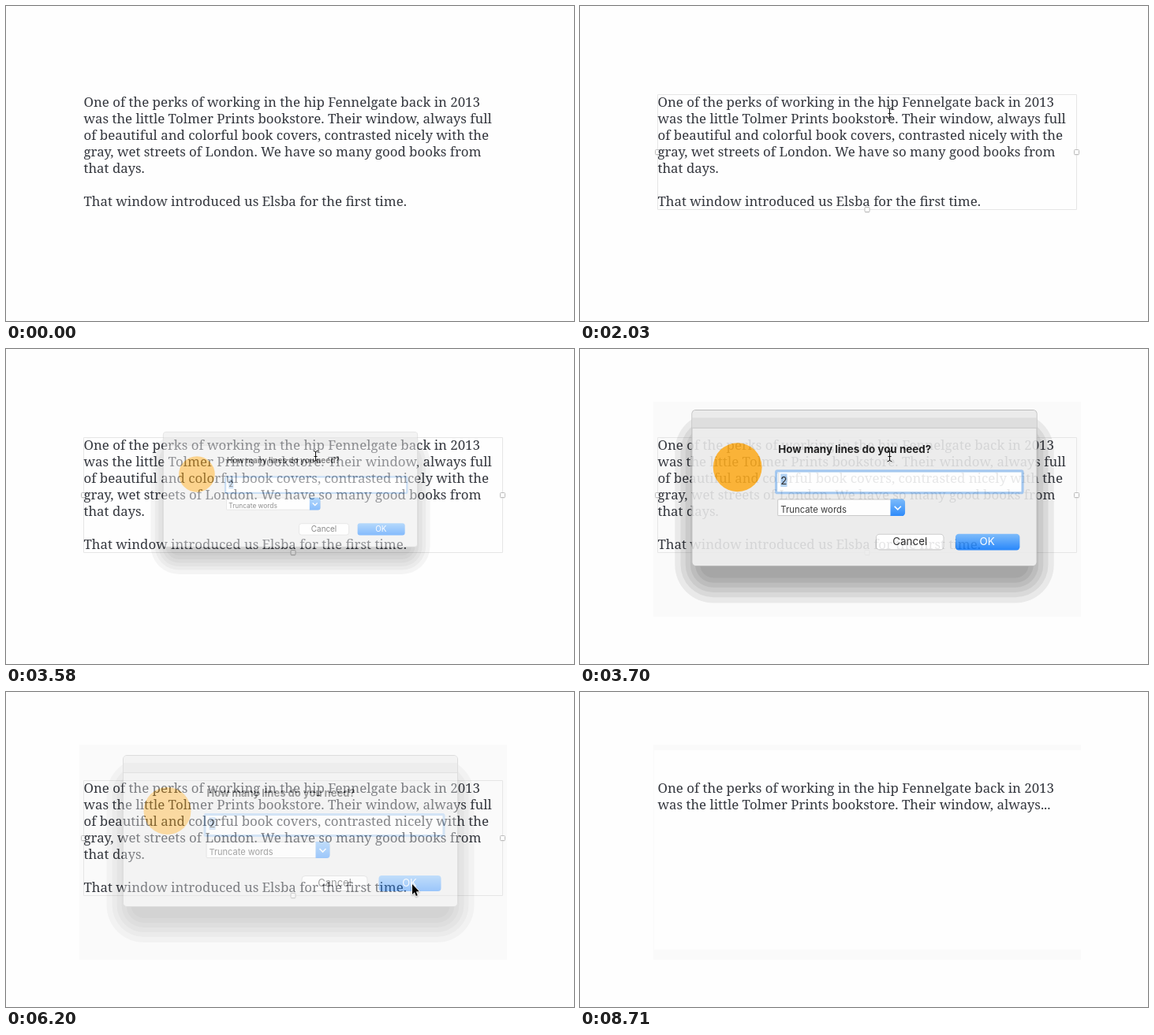
These frames come from a looping animation (720x400 px, 9.19 s). An HTML page with a canvas:

```html
<!DOCTYPE html>
<html lang="en">
<head>
<meta charset="utf-8">
<title>Truncate lines</title>
<style>
html, body { margin: 0; width: 100%; height: 100%; overflow: hidden; background: #fefefe; }
canvas { display: block; }
</style>
</head>
<body>
<canvas id="stage" width="720" height="400"></canvas>
<script>
const LOOP = 9190, STEP = 120;
const PAPER = '#fefefe', INK = '#34373e';
const SERIF = '16.85px "Noto Serif", serif';
const UI = 'Inter, sans-serif';

const stage = document.getElementById('stage').getContext('2d');
const layerCanvas = document.createElement('canvas');
layerCanvas.width = 720;
layerCanvas.height = 400;
const layer = layerCanvas.getContext('2d');

const paragraph = [
  'One of the perks of working in the hip Fennelgate back in 2013',
  'was the little Tolmer Prints bookstore. Their window, always full',
  'of beautiful and colorful book covers, contrasted nicely with the',
  'gray, wet streets of London. We have so many good books from',
  'that days.',
  '',
  'That window introduced us Elsba for the first time.'
];
const truncated = [paragraph[0], paragraph[1].replace(' full', '...')];

// Pointer tips, one per step, starting at the given time.
const moves = [
  { start: 1560, tips: [[417, 270], [405, 208], [396, 160], [392, 140], [392, 136]] },
  { start: 4410, tips: [[397, 145], [415, 183], [441, 219], [474, 243], [504, 253], [514, 255]] },
  { start: 5600, tips: [[514, 252], [515, 246], [515, 243]] }
];

function box(c, x, y, w, h, r, fill, stroke) {
  c.beginPath();
  c.roundRect(x, y, w, h, r);
  if (fill) { c.fillStyle = fill; c.fill(); }
  if (stroke) { c.strokeStyle = stroke; c.lineWidth = 1; c.stroke(); }
}

function label(c, text, x, y, font, color = '#161616', align = 'left') {
  c.font = font;
  c.fillStyle = color;
  c.textAlign = align;
  c.fillText(text, x, y);
}

function ramp(c, top, bottom, from, to) {
  const g = c.createLinearGradient(0, top, 0, bottom);
  g.addColorStop(0, from);
  g.addColorStop(1, to);
  return g;
}

function polyline(c, points) {
  c.beginPath();
  points.forEach(([x, y]) => c.lineTo(x, y));
}

function drawText(lines) {
  lines.forEach((line, i) => label(stage, line, 98.5, 128 + 21 * i, SERIF, INK));
}

function drawSelection() {
  box(stage, 98.5, 112.5, 531, 146, 0, null, '#e6e6e6');
  for (const [x, y] of [[98.5, 185.5], [629.5, 185.5], [364, 258.5]]) {
    box(stage, x - 3, y - 2, 6, 6, 1, '#dcdcdc');
    box(stage, x - 3, y - 3, 6, 6, 1, '#fff', '#bcbcbc');
  }
}

function drawDialog(c) {
  for (const spread of [21, 14, 8, 2, -4, -10]) {
    box(c, 149 - spread, 105 - spread, 424 + 2 * spread, 192 + 2 * spread, 26 + spread, 'rgba(0,0,0,.077)');
  }
  box(c, 149, 80.5, 424, 192, 4.5, '#ebebeb', '#b4b4b4');
  box(c, 149.5, 81, 423, 9, [4, 4, 0, 0], '#e9e9e9');
  box(c, 149.5, 90, 423, 12, 0, '#dbdbdb');
  box(c, 149.5, 102, 423, 1, 0, '#bdbdbd');

  c.beginPath();
  c.arc(205, 151, 30, 0, Math.PI * 2);
  c.fillStyle = '#fbaa1e';
  c.fill();

  label(c, 'How many lines do you need?', 255, 133, `700 13px ${UI}`, '#0c0c0c');

  box(c, 251, 154, 306, 30, 3, '#98c1ee');
  box(c, 254, 157, 300, 24, 0, '#fff');
  box(c, 258, 159, 8, 16, 0, '#a9cdf3');
  label(c, '2', 258, 172, `13px ${UI}`);

  box(c, 254.5, 190.5, 156, 20, [1, 4, 4, 1], '#fff', '#c4c4c4');
  label(c, 'Truncate words', 258, 207, `11px ${UI}`, '#222');
  box(c, 393, 190, 18, 21, [0, 4, 4, 0], ramp(c, 190, 211, '#6cb3fa', '#137cfb'));
  polyline(c, [[398, 199], [402, 203], [406, 199]]);
  c.strokeStyle = '#fff';
  c.lineWidth = 1.6;
  c.stroke();

  box(c, 375.5, 233.5, 83, 19, 4, '#fff', '#c8c8c8');
  label(c, 'Cancel', 417, 247, `13px ${UI}`, '#161616', 'center');
  box(c, 473, 233, 79, 20, 4, ramp(c, 233, 253, '#6eb4fa', '#0c78fc'));
  label(c, 'OK', 512, 247, `13px ${UI}`, '#fff', 'center');
}

function showDialog({ scale, alpha, cy }) {
  layer.setTransform(1, 0, 0, 1, 0, 0);
  layer.clearRect(0, 0, 720, 400);
  layer.translate(360.5, cy);
  layer.scale(scale, scale);
  layer.translate(-361, -176);
  drawDialog(layer);
  stage.globalAlpha = alpha;
  stage.drawImage(layerCanvas, 0, 0);
  stage.globalAlpha = 1;
}

function dialogPose(t) {
  if (t < 3460 || t >= 6320) return null;
  if (t < 3580) return { scale: .25, alpha: .1, cy: 183 };
  if (t < 3700) return { scale: .76, alpha: .5, cy: 178 };
  if (t < 3820) return { scale: 1.031, alpha: .88, cy: 176 };
  return { scale: 1, alpha: t < 6200 ? 1 : .4, cy: 176 };
}

function drawArrow(x, y) {
  stage.save();
  stage.translate(x, y);
  polyline(stage, [[0, 0], [0, 13], [2.9, 10.3], [4.8, 15], [6.8, 14.2], [4.9, 9.6], [8.8, 9.3]]);
  stage.closePath();
  stage.shadowColor = 'rgba(0,0,0,.3)';
  stage.shadowBlur = 2;
  stage.shadowOffsetY = 1;
  stage.strokeStyle = '#fff';
  stage.lineWidth = 1.6;
  stage.lineJoin = 'round';
  stage.stroke();
  stage.shadowColor = 'transparent';
  stage.fillStyle = '#000';
  stage.fill();
  stage.restore();
}

function drawIBeam(x, y) {
  stage.beginPath();
  for (const side of [-1, 1]) {
    stage.moveTo(x + .5, y - 5.5);
    stage.lineTo(x + .5 + 3 * side, y - 7);
    stage.moveTo(x + .5, y + 5.5);
    stage.lineTo(x + .5 + 3 * side, y + 7);
  }
  stage.moveTo(x + .5, y - 6);
  stage.lineTo(x + .5, y + 6);
  stage.moveTo(x - 1.5, y + .5);
  stage.lineTo(x + 2.5, y + .5);
  stage.strokeStyle = '#111';
  stage.lineWidth = 1;
  stage.stroke();
}

function drawPointer(t) {
  const move = moves.findLast(m => t >= m.start);
  if (!move || t >= 8710) return;
  const step = Math.floor((t - move.start + 10) / STEP);
  const [x, y] = move.tips[Math.min(step, move.tips.length - 1)];
  if (t >= 1910 && t < 4410) drawIBeam(x, y);
  else drawArrow(x, y + 1);
}

function draw(t) {
  box(stage, 0, 0, 720, 400, 0, PAPER);
  if (t >= 1560 && t < 1670) box(stage, 448.5, 356.5, 56, 60, 0, '#f5f5f5', '#dcdcdc');
  if (t >= 3700) box(stage, 93, 67, 542, 273, 0, '#fafafa');
  if (t >= 6320) box(stage, 94, 74, 541, 253, 0, PAPER);
  if (t >= 1910 && t < 6320) drawSelection();
  drawText(t < 6320 ? paragraph : truncated);
  const pose = dialogPose(t);
  if (pose) showDialog(pose);
  drawPointer(t);
}

const start = performance.now();
function tick() {
  draw((performance.now() - start) % LOOP);
  requestAnimationFrame(tick);
}
tick();
</script>
</body>
</html>
```
